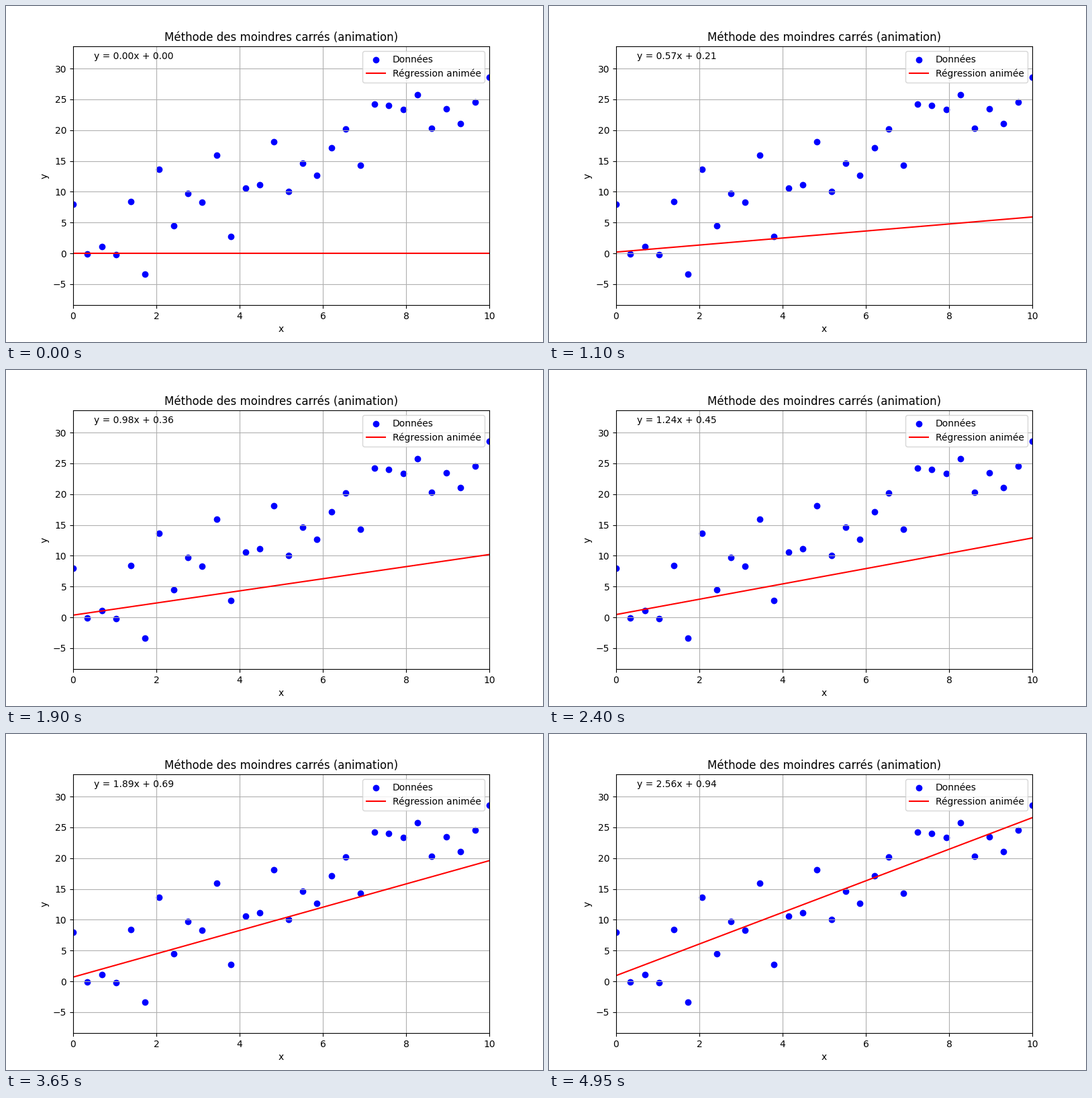
Recreate the animation shown at these times as a matplotlib script. Size 800x500 px, loop 5 s.

```python
import numpy as np
import matplotlib.pyplot as plt
from matplotlib.animation import FuncAnimation

FRAMES = 100
INTERVAL = 50

# Noisy samples around a straight line
rng = np.random.RandomState(1)
x = np.linspace(0, 10, 30)
y = 2.5 * x + 1.5 + 4 * rng.randn(x.size)

# Least squares solution
slope, intercept = np.polyfit(x, y, 1)

fig, ax = plt.subplots(figsize=(8, 5), dpi=100)
ax.scatter(x, y, color="blue", label="Données")
line, = ax.plot(x, 0 * x, color="red", label="Régression animée")
equation = ax.text(0.05, 0.95, "", transform=ax.transAxes)

ax.set_xlim(0, 10)
ax.set_ylim(y.min() - 5, y.max() + 5)
ax.set_title("Méthode des moindres carrés (animation)")
ax.set_xlabel("x")
ax.set_ylabel("y")
ax.legend(loc="upper right")
ax.grid(True)


def update(frame):
    t = frame / (FRAMES - 1)
    a, b = t * slope, t * intercept
    line.set_ydata(a * x + b)
    equation.set_text(f"y = {a:.2f}x + {b:.2f}")
    return line, equation


anim = FuncAnimation(fig, update, frames=FRAMES, interval=INTERVAL,
                     repeat=True, repeat_delay=0)
plt.show()
```
